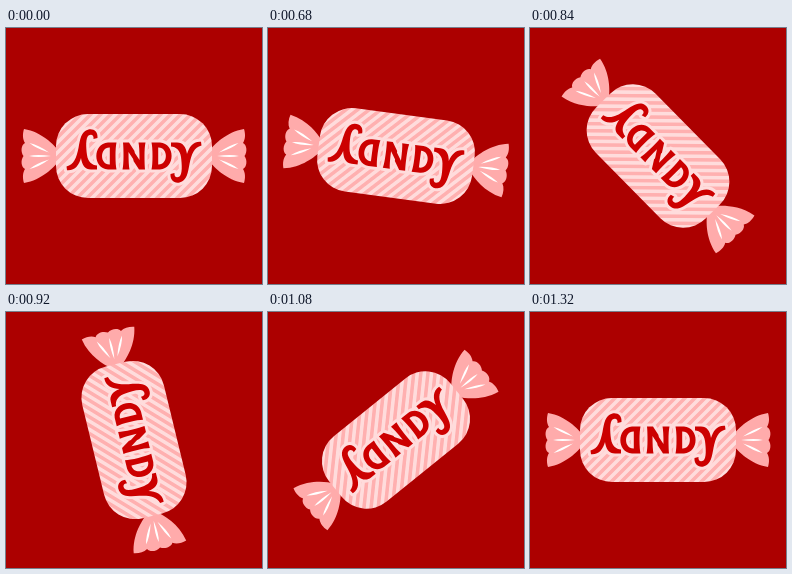
Animation of 256x256 px, one loop 2920 ms. Source, as an HTML page:

```html
<!DOCTYPE html>
<html lang="en">
<head>
<meta charset="utf-8">
<title>Candy</title>
<style>
  html, body { margin: 0; width: 100%; height: 100%; overflow: hidden; background: #ac0000; }
  svg { display: block; width: 100%; height: 100%; }
  .halo { fill: #ffdcdc; stroke: #ffdcdc; stroke-width: 6; stroke-linejoin: round; }
  .ink { fill: #cc0000; }
</style>
</head>
<body>
<svg viewBox="0 0 256 256" role="img" aria-label="Candy">
  <defs>
    <pattern id="stripes" width="8" height="7.07" patternUnits="userSpaceOnUse"
             patternTransform="translate(128 128) rotate(-45)">
      <rect width="8" height="7.07" fill="#ffdcdc"/>
      <rect y="1.77" width="8" height="3.53" fill="#ffb0b0"/>
    </pattern>

    <g id="twist">
      <path fill="#ffabab" d="M52 122 C48 117 36 104 18 101 C16.500 106 16.500 111 19 115
        C15 117 14.500 124 17.500 128 C14.500 132 15 139 19 141
        C16.500 145 16.500 150 18 155 C36 152 48 139 52 134 Z"/>
      <g fill="#fff">
        <path d="M23 128 Q31 125.800 45 128 Q31 130.200 23 128 Z"/>
        <path d="M23.500 115 Q32 116.500 43 124.500 Q30 120.500 23.500 115 Z"/>
        <path d="M23.500 141 Q32 139.500 43 131.500 Q30 135.500 23.500 141 Z"/>
      </g>
    </g>

    <!-- The lettering reads the same upside down, so half of it is enough. -->
    <g id="half">
      <path d="M91.500 110 C92 104 88 100.500 82.500 101.500 C75 103 74 112 72.500 120
        C70.500 130 68 136.500 60.500 138.500 L61 142.300 C69 143 73 137 75 130
        C76 137 79 141.500 85 141.500 H91 V137.500 C86 137 82 134 81 127
        C80 119 79.500 110 82.500 107.500 C86 105.500 88 108 87.500 111 Z"/>
      <path fill-rule="evenodd" d="M110.500 114.500 H102 C86.500 115.500 86.500 140.500 102 141.500
        H110.500 Q109.500 137 109.500 128 Q109.500 119 110.500 114.500 Z
        M103.800 119.500 V136.500 C93.500 137 93.500 119 103.800 119.500 Z"/>
      <path d="M117 114.500 H123 L128.500 123 V133 L122.500 124 Q122.500 137 123.500 141.500
        H116.500 Q117.500 137 117.500 128 Q117.500 119 117 114.500 Z"/>
    </g>
    <g id="word">
      <use href="#half"/>
      <use href="#half" transform="rotate(180 128 128)"/>
    </g>
  </defs>

  <g id="candy">
    <use href="#twist"/>
    <use href="#twist" transform="rotate(180 128 128)"/>
    <rect x="50" y="86" width="156" height="84" rx="32" fill="url(#stripes)"/>
    <use href="#word" class="halo"/>
    <use href="#word" class="ink"/>
  </g>
</svg>
<script>
  const LOOP = 2920, STEP = 20;
  const FIRST = 600, LAST = 1320;   // turning is visible between these times
  const START = 570, SPAN = 760;    // full extent of the easing curve
  const candy = document.getElementById('candy');

  const ease = p => p < 0.5 ? 2 * p * p : 1 - 2 * (1 - p) ** 2;

  function angleAt(ms) {
    if (ms < FIRST) return 0;
    if (ms >= LAST) return 180;
    const held = Math.floor(ms / STEP) * STEP;
    return 180 * ease((held - START) / SPAN);
  }

  function draw() {
    const angle = angleAt(performance.now() % LOOP);
    candy.setAttribute('transform', `rotate(${angle.toFixed(3)} 128 128)`);
    requestAnimationFrame(draw);
  }
  draw();
</script>
</body>
</html>
```
